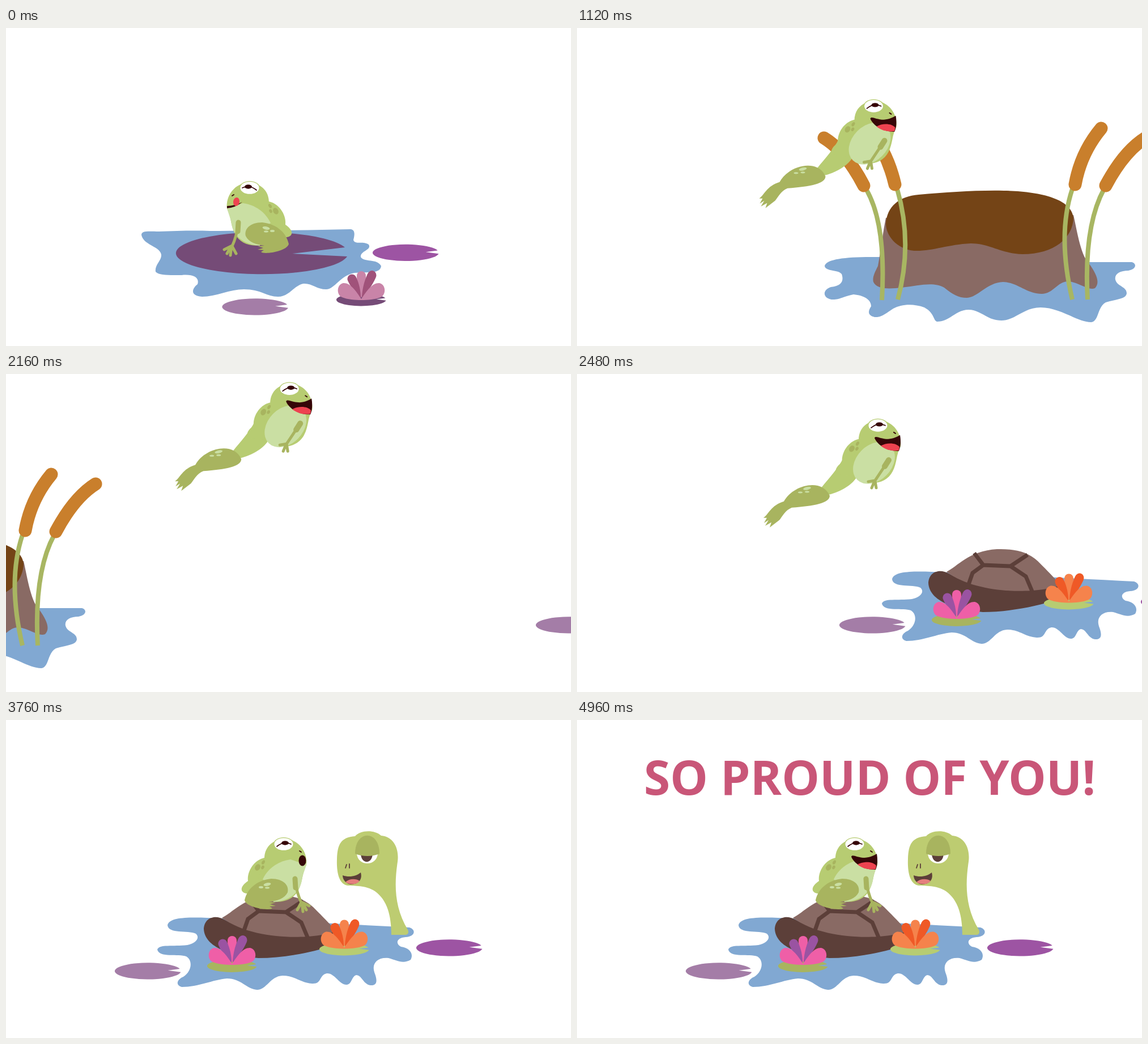
An HTML page for the animation above (6.72 s loop, 997 px wide and 561 px high).

```html
<!DOCTYPE html>
<html lang="en">
<head>
<meta charset="utf-8">
<title>So proud of you</title>
<style>
html, body { margin: 0; width: 100%; height: 100%; overflow: hidden; background: #fff; }
svg { display: block; width: 100%; height: 100%; }
.water { fill: #81a8d2; }
.skin { fill: #b7cc72; }
.limb { fill: #a8b45f; }
.pale { fill: #cadfa3; }
.ink { fill: #360608; }
.red { fill: #ee4350; }
.line { fill: none; stroke-linecap: round; }
.arm { stroke: #a8b45f; stroke-width: 5; }
.stem { fill: none; stroke: #a8b662; stroke-width: 8; }
.tail { stroke: #c97f2c; stroke-width: 23; }
#text { font: 700 84px "Open Sans", "Noto Sans", sans-serif; fill: #c95678; }
</style>
</head>
<body>
<svg viewBox="0 0 997 561">
  <defs>
    <path id="pad" d="M96-7L60-2L99 3A100 25 0 1 1 96-7Z"/>
    <path id="lobe" d="M0 0C-10-15-20-29-32-28C-44-25-44-7-34-3C-25 1-10 2 0 2Z"/>
    <path id="petal" d="M0-2C-5-14-8-26-8-41A8 8 0 0 1 8-41C8-26 5-14 0-2Z"/>
    <g id="flower">
      <use href="#petal" fill="var(--light)"/>
      <g fill="var(--dark)">
        <use href="#petal" transform="rotate(-25) scale(1 .96)"/>
        <use href="#petal" transform="rotate(24) scale(1 1.1)"/>
      </g>
      <g fill="var(--light)"><use href="#lobe"/><use href="#lobe" transform="scale(-1 1)"/></g>
    </g>
    <clipPath id="surface"><path d="M560 150H740V379H560Z"/></clipPath>
  </defs>

  <g id="lily">
    <path class="water" d="M239 365C239 357 252 359 270 359C300 358 330 357 360 358C430 358 520 357 608 355C617 356 615 366 613 374C616 383 630 375 640 382C646 392 625 393 626 404C632 414 655 406 662 420C660 434 640 430 615 432C590 436 580 461 565 461C548 461 540 450 525 451C508 454 500 474 480 474C460 474 450 461 420 461C395 461 370 474 346 474C322 472 330 458 338 452C342 440 330 434 310 436C290 436 270 437 264 430C262 418 275 410 274 400C272 385 242 383 239 365Z"/>
    <path fill="#754b77" d="M598 387L505 398L602 403A152 37 0 1 1 598 387Z"/>
    <use href="#pad" fill="#9d54a3" transform="translate(705.5 396.5) scale(.585)"/>
    <use href="#pad" fill="#a47da7" transform="translate(440 492) scale(.585)"/>
    <use href="#pad" fill="#754b77" transform="translate(627 479.5) scale(.44)"/>
    <use href="#flower" x="627" y="478" style="--light:#c984a8;--dark:#a0527a"/>
  </g>

  <g id="stump">
    <path class="water" d="M64 420C66 408 100 403 160 404L520 413L606 413C616 416 613 426 600 428C585 428 575 434 577 444C580 456 597 456 597 468C596 478 580 478 560 484C545 492 548 518 534 519C510 519 480 493 445 493C415 493 400 516 376 516C350 516 340 497 318 497C295 497 285 518 262 518C255 515 258 503 240 493C220 486 200 487 185 495C172 503 165 511 152 510C140 507 140 500 146 491C146 480 135 472 115 470C95 474 90 480 76 479C60 476 60 462 75 457C95 455 98 445 94 434C88 426 66 430 64 420Z"/>
    <path fill="#896a64" d="M172 335C166 365 162 400 158 420C152 432 148 440 150 448C156 462 180 460 200 458C230 455 255 447 275 458C290 470 300 476 315 476C335 475 350 449 379 448C405 449 420 469 447 469C468 469 475 446 495 447C515 450 530 464 541 459C550 450 545 435 530 415C515 400 508 350 503 330Z"/>
    <path fill="#744416" d="M172 345C174 315 195 297 230 294C280 290 330 286 380 287C440 288 500 300 503 335C502 370 470 399 413 399C375 398 355 380 322 380C280 382 255 394 222 393C190 390 172 365 172 345Z"/>
    <path class="stem" d="M137 284Q173 345 165 480M192 284Q220 380 193 479M501 284Q474 365 501 479M557 284Q521 350 528 479"/>
    <path class="line tail" d="M63 194Q102 218 133 278M141 177Q175 220 188 276M552 177Q516 220 506 276M630 194Q592 218 560 278"/>
  </g>

  <g id="turtle">
    <path class="water" d="M285 362C288 348 320 348 355 349C450 352 600 360 712 366C724 370 722 382 705 383C690 384 686 394 697 400C712 402 720 412 714 423C700 431 690 424 675 420C655 418 645 430 650 445C656 460 655 469 643 468C630 466 628 450 618 450C610 452 610 467 601 467C588 467 580 446 566 447C552 450 558 466 540 465C520 464 510 451 488 451C466 452 460 476 443 476C425 475 415 456 390 456C365 458 340 471 310 471C299 468 301 458 313 453C328 443 330 424 318 417C305 412 270 420 267 405C270 395 295 400 320 397C335 394 343 384 335 377C320 370 287 378 285 362Z"/>
    <g clip-path="url(#surface)">
      <g id="head">
        <path fill="#bdcc71" d="M680 380C680 345 673 318 651 302C634 291 615 293 603 292C588 290 583 270 584 245C585 220 590 207 616 205C625 194 650 193 662 204C685 206 694 228 691 250C685 290 685 330 709 370C713 378 705 380 700 380Z"/>
        <path fill="#fff" d="M619 235C620 259 655 259 656 235Z"/>
        <path fill="#5c3f39" d="M626 236C627 255 646 255 647 236Z"/>
        <path class="limb" d="M616 236C616 193 659 193 659 236Q638 244 616 236Z"/>
        <path class="line" stroke="#5c3f39" stroke-width="1.8" d="M601 255L599 261M606 254V261"/>
        <path fill="#5c3f39" d="M594 274C605 278 618 276 626 269C630 284 619 290 608 290C598 288 594 280 594 274Z"/>
        <path fill="#e47f7d" d="M599 286C605 280 617 279 624 284C618 291 606 291 599 286Z"/>
      </g>
    </g>
    <path fill="#5c3f39" d="M349 368C351 346 372 344 385 352C420 372 470 380 577 374L577 398C540 410 490 420 445 420C400 416 350 402 349 368Z"/>
    <path fill="#896a64" d="M381 349C400 340 420 312 470 309C502 308 525 314 542 330C554 342 566 354 574 363L578 374C545 386 440 392 381 349Z"/>
    <path fill="none" stroke="#5c3f39" stroke-width="7" d="M430 316L446 337L494 339L524 319M446 337L427 351L420 371M494 339L521 357L532 383"/>
    <use href="#pad" fill="#9d54a3" transform="translate(782.5 402) scale(.585)"/>
    <use href="#pad" fill="#a47da7" transform="translate(250.5 443) scale(.585)"/>
    <use href="#pad" class="limb" transform="translate(399 434) scale(.44)"/>
    <use href="#pad" class="skin" transform="translate(597 404.5) scale(.44)"/>
    <use href="#flower" x="399" y="430" style="--light:#ef5fa7;--dark:#9a53a2"/>
    <use href="#flower" x="597" y="401.500" style="--light:#f5834c;--dark:#ef5926"/>
  </g>

  <g id="frog">
    <g data-pose="fly">
      <path class="skin" d="M429 276C420 295 405 310 390 329L404 341C424 336 444 324 452 311Z"/>
      <path class="limb" d="M405 343C405 356 378 361 338 364C326 369 322 379 316 386L299 399L302 390L291 396L297 386L289 391L294 382L288 382C297 376 301 360 324 353C340 323 392 311 405 343Z"/>
      <g class="pale"><ellipse cx="365" cy="330" rx="7" ry="2.6" transform="rotate(-12 365 330)"/><ellipse cx="353" cy="337" rx="4" ry="1.6"/><ellipse cx="365" cy="336" rx="4" ry="1.6"/></g>
    </g>
    <path class="skin" d="M456 243C435 248 425 270 427 284C412 294 413 304 424 306L470 312L480 250Z"/>
    <path class="skin" d="M456 247C455 222 473 211 490 210C515 209 533 232 530 256C522 270 524 285 516 300C508 316 490 323 472 320C450 315 440 300 445 280Z"/>
    <g class="limb"><ellipse cx="444" cy="260" rx="4.5" ry="6" transform="rotate(30 444 260)"/><ellipse cx="454" cy="251" rx="2.5" ry="4" transform="rotate(30 454 251)"/><ellipse cx="453" cy="260" rx="2.5" ry="3.5" transform="rotate(30 453 260)"/></g>
    <path class="pale" data-pose="sit push" d="M453 281C462 262 480 249 502 246C512 249 522 253 530 253C529 262 524 270 522 283C519 300 505 319 472 321C468 310 470 292 453 281Z"/>
    <ellipse class="pale" data-pose="fly" cx="483" cy="285" rx="42" ry="31" transform="rotate(-45 483 285)"/>

    <ellipse class="skin" cx="490" cy="219" rx="18" ry="12"/>
    <ellipse fill="#fff" cx="490" cy="219" rx="16.5" ry="10.8"/>
    <path class="line" stroke="#360608" stroke-width="1.7" d="M478 223Q490 213 503 219"/>
    <ellipse class="ink" cx="492.500" cy="217" rx="6.500" ry="3.700"/>
    <path class="line" stroke="#360608" stroke-width="2" d="M518 231L521 233"/>

    <g data-mouth="tongue">
      <path class="ink" d="M503 244Q517 251 530 251V255Q515 254 503 244Z"/>
      <ellipse class="red" cx="513.500" cy="243.500" rx="5.500" ry="7.500" transform="rotate(-8 513.5 243.5)"/>
    </g>
    <ellipse class="ink" data-mouth="gasp" cx="523" cy="248" rx="6.500" ry="9.500"/>
    <g data-mouth="smile">
      <path class="ink" d="M484 241C486 236 494 243 508 243C518 242 524 239 529 236C531 248 530 257 527 264C505 265 488 252 484 241Z"/>
      <path class="red" d="M495 255C505 249 522 249 528 257L527 263C515 265 504 262 495 255Z"/>
    </g>

    <g class="line arm">
      <path data-pose="sit" d="M510 281Q513 305 521 322M521 322L514 335M522 322L524 338M523 322L530 335M523 322L535 328"/>
      <path data-pose="sit push" stroke-width="9" d="M510 280L511 296"/>
      <path data-pose="push" d="M510 281L511 325M511 325L503 335M511 325L508 337M511 325L516 337M511 325L522 333"/>
      <path data-pose="fly" d="M507 283L485 316M485 316L473 318M484 317L479 329M485 317L487 329"/>
      <path data-pose="fly" stroke-width="10" d="M509 280L502 291"/>
    </g>
    <g data-pose="sit">
      <path class="limb" d="M421 318C425 300 440 283 468 280C490 280 500 292 497 304C492 315 478 319 464 321L476 322L466 325L476 328L465 329L470 332C466 337 425 332 421 318Z"/>
      <g class="pale"><ellipse cx="461" cy="290" rx="6.500" ry="2.700" transform="rotate(-10 461 290)"/><ellipse cx="450" cy="295" rx="4" ry="2"/><ellipse cx="461" cy="296" rx="4" ry="1.700"/></g>
    </g>
    <g data-pose="push">
      <path class="limb" d="M402 338C406 334 412 336 414 339C422 318 440 311 462 312C482 316 490 326 486 336C472 346 445 350 422 352C430 358 437 358 447 371L437 367L442 375L433 371L434 377C416 365 400 350 402 338Z"/>
      <g class="pale"><ellipse cx="449" cy="320" rx="6.500" ry="2.700" transform="rotate(-10 449 320)"/><ellipse cx="439" cy="325" rx="4" ry="2"/><ellipse cx="450" cy="326" rx="4" ry="2"/></g>
    </g>
  </g>

  <text id="text" x="118" y="132">SO PROUD OF YOU!</text>
</svg>
<script>
const STEP = 80, LOOP = 6720;
const part = Object.fromEntries(
  ['lily', 'stump', 'turtle', 'head', 'frog', 'text'].map(id => [id, document.getElementById(id)]));
const poses = document.querySelectorAll('[data-pose]');
const mouths = document.querySelectorAll('[data-mouth]');

// Tables hold [step, value] pairs.
const stumpIn = [[3, 1490], [4, 1460], [5, 1390], [9, 964], [14, 373], [15, 255], [16, 175], [17, 150]];
const turtleIn = [[21, 1365], [22, 1320], [23, 1215], [31, 271], [32, 155], [33, 55], [34, 10], [35, 0]];
const frogX = [[0, -28], [5, -29], [9, 10], [12, 30], [14, 33.5], [15, 10], [16, -18], [17, -28],
  [23, -29], [28, 20], [31, 41], [32, 30], [33, 10], [34, 0]];
const squash = [[15, 0], [16, .08], [17, 0], [33, 0], [34, .1], [35, .07], [36, .03], [37, 0]];
const textY = [[50, 235], [52, 210], [54, 177], [56, 127], [58, 75], [60, 30], [62, 0]];
const poseAt = [[0, 'sit'], [4, 'push'], [6, 'fly'], [15, 'push'], [16, 'sit'],
  [22, 'push'], [24, 'fly'], [33, 'push'], [34, 'sit']];
const mouthAt = [[0, 'tongue'], [6, 'smile'], [19, 'tongue'], [24, 'smile'],
  [37, 'tongue'], [46, 'gasp'], [60, 'smile']];

function tween(table, n) {
  const i = table.findIndex(([at]) => at > n);
  if (i === 0) return table[0][1];
  if (i < 0) return table[table.length - 1][1];
  const [a, from] = table[i - 1], [b, to] = table[i];
  return from + (to - from) * (n - a) / (b - a);
}
const hold = (table, n) => table.filter(([at]) => at <= n).pop()[1];
const clamp = (v, lo, hi) => Math.min(hi, Math.max(lo, v));

function hop(n, up, top, down, startY, endY) {
  const t = clamp(n, up, down), peak = -196;
  return t < top
    ? peak + (startY - peak) * ((top - t) / (top - up)) ** 2
    : peak + (endY - peak) * ((t - top) / (down - top)) ** 2;
}

function move(el, x, y = 0, extra = '') {
  el.setAttribute('transform', `translate(${x} ${y}) ${extra}`);
}
function show(el, visible) { el.style.display = visible ? '' : 'none'; }

function draw(n) {
  const stump = tween(stumpIn, n), turtle = tween(turtleIn, n);
  move(part.lily, stump - stumpIn[0][1]);
  move(part.stump, stump + turtle - turtleIn[0][1]);
  move(part.turtle, turtle);
  move(part.head, 0, 18 * clamp(47 - n, 0, 11));

  const y = n < 18 ? hop(n, 4.4, 9.67, 15.37, 63, 3) : hop(n, 22.4, 27.67, 33.33, 3, 0);
  const s = tween(squash, n);
  if (n < 2) move(part.frog, 920, y, 'scale(-1 1)');
  else move(part.frog, tween(frogX, n), y,
    `translate(475 335) scale(${1 + s} ${1 - s}) translate(-475 -335)`);

  const pose = hold(poseAt, n), mouth = hold(mouthAt, n);
  poses.forEach(el => show(el, el.dataset.pose.split(' ').includes(pose)));
  mouths.forEach(el => show(el, el.dataset.mouth === mouth));

  show(part.text, n >= 50);
  part.text.style.opacity = clamp((n - 49) / 3, 0, 1);
  move(part.text, 0, tween(textY, n));
}

const start = performance.now();
function tick() {
  draw(Math.floor((performance.now() - start) % LOOP / STEP));
  requestAnimationFrame(tick);
}
tick();
</script>
</body>
</html>
```
